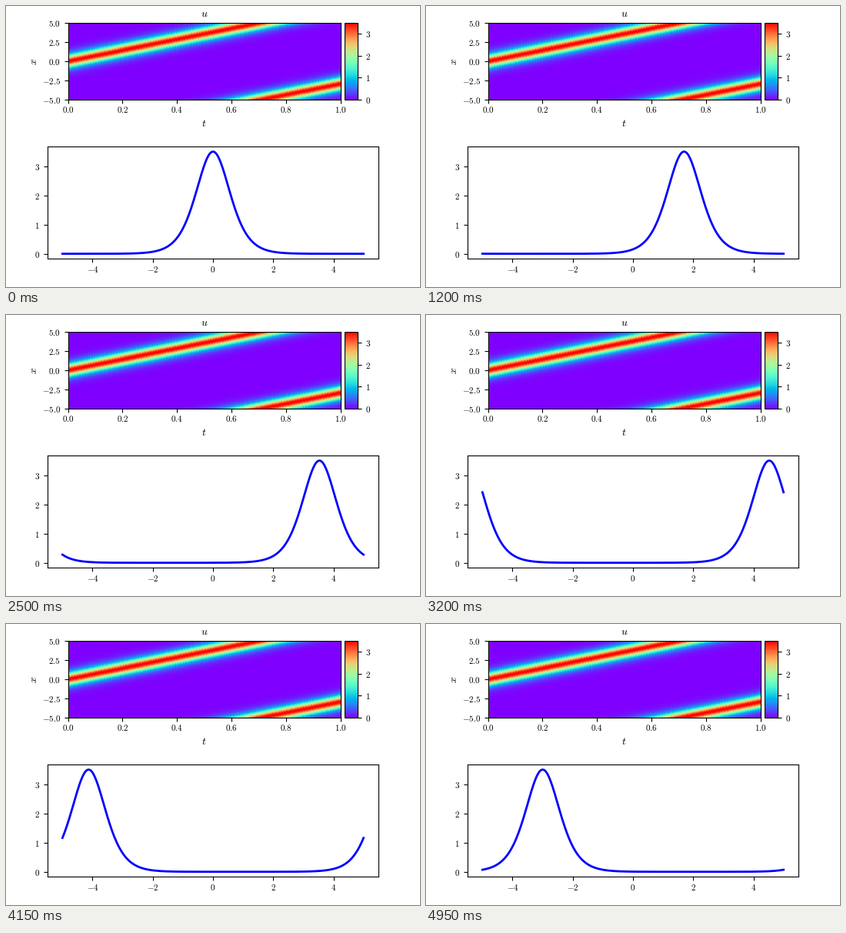
Recreate the animation shown at these times as a matplotlib script. Size 538 by 366 pixels, loop 5000 ms.

```python
import numpy as np
import matplotlib.pyplot as plt
from matplotlib.animation import FuncAnimation
from mpl_toolkits.axes_grid1 import make_axes_locatable

W, H, DPI = 538, 366, 100
FRAMES, INTERVAL = 100, 50
SPEED, PERIOD = 7.0, 10.0

plt.rcParams.update({
    "mathtext.fontset": "cm",
    "font.size": 10,
    "xtick.labelsize": 8,
    "ytick.labelsize": 8,
})


def soliton(x, t):
    """Travelling KdV wave on a periodic domain."""
    shift = (x - SPEED * t + PERIOD / 2) % PERIOD - PERIOD / 2
    images = (shift + k * PERIOD for k in (-1, 0, 1))
    return sum(SPEED / 2 / np.cosh(np.sqrt(SPEED) / 2 * s) ** 2 for s in images)


def math_ticks(axis, values, fmt):
    axis.set_ticks(values, labels=[f"${v:{fmt}}$" for v in values])


def baseline_x_labels(ax):
    """Hang the x tick labels by their baseline."""
    ax.tick_params(axis="x", pad=9)
    for label in ax.get_xticklabels():
        label.set_va("baseline")


def math_label(text, px, py, rotation=0):
    fig.text(px / W, 1 - py / H, text, rotation=rotation, ha="center",
             va="baseline", rotation_mode="anchor")


x = np.linspace(-5, 5, 401)
times = np.linspace(0, 1, FRAMES)

fig = plt.figure(figsize=(W / DPI, H / DPI), dpi=DPI)

# Space-time map with its colour bar
top = fig.add_axes([0.15, 2 / 3, 0.7, 0.94 - 2 / 3])
image = top.imshow(soliton(x[:, None], times[None, :]), cmap="rainbow",
                   interpolation="nearest", origin="lower", aspect="auto",
                   extent=[0, 1, -5, 5])
bar_ax = make_axes_locatable(top).append_axes("right", size="5%", pad=0.05)
bar = fig.colorbar(image, cax=bar_ax)
math_ticks(bar, [0, 1, 2, 3], "d")
math_ticks(top.xaxis, [0, 0.2, 0.4, 0.6, 0.8, 1], ".1f")
math_ticks(top.yaxis, [-5, -2.5, 0, 2.5, 5], ".1f")
baseline_x_labels(top)
math_label("$u$", 257.7, 13.7)
math_label("$t$", 257.7, 156.8)
math_label("$x$", 39.9, 72, rotation=90)

# Moving profile
bottom = fig.add_axes([0.1, 0.1, 0.8, 0.4])
line, = bottom.plot(x, soliton(x, 0), "b-", lw=2)
bottom.set_xlim(-5.5, 5.5)
bottom.set_ylim(-0.175, 3.675)
math_ticks(bottom.xaxis, [-4, -2, 0, 2, 4], "d")
math_ticks(bottom.yaxis, [0, 1, 2, 3], "d")
baseline_x_labels(bottom)


def update(i):
    line.set_ydata(soliton(x, times[i]))
    return line,


anim = FuncAnimation(fig, update, frames=FRAMES, interval=INTERVAL,
                     repeat=True, repeat_delay=0)
plt.show()
```
